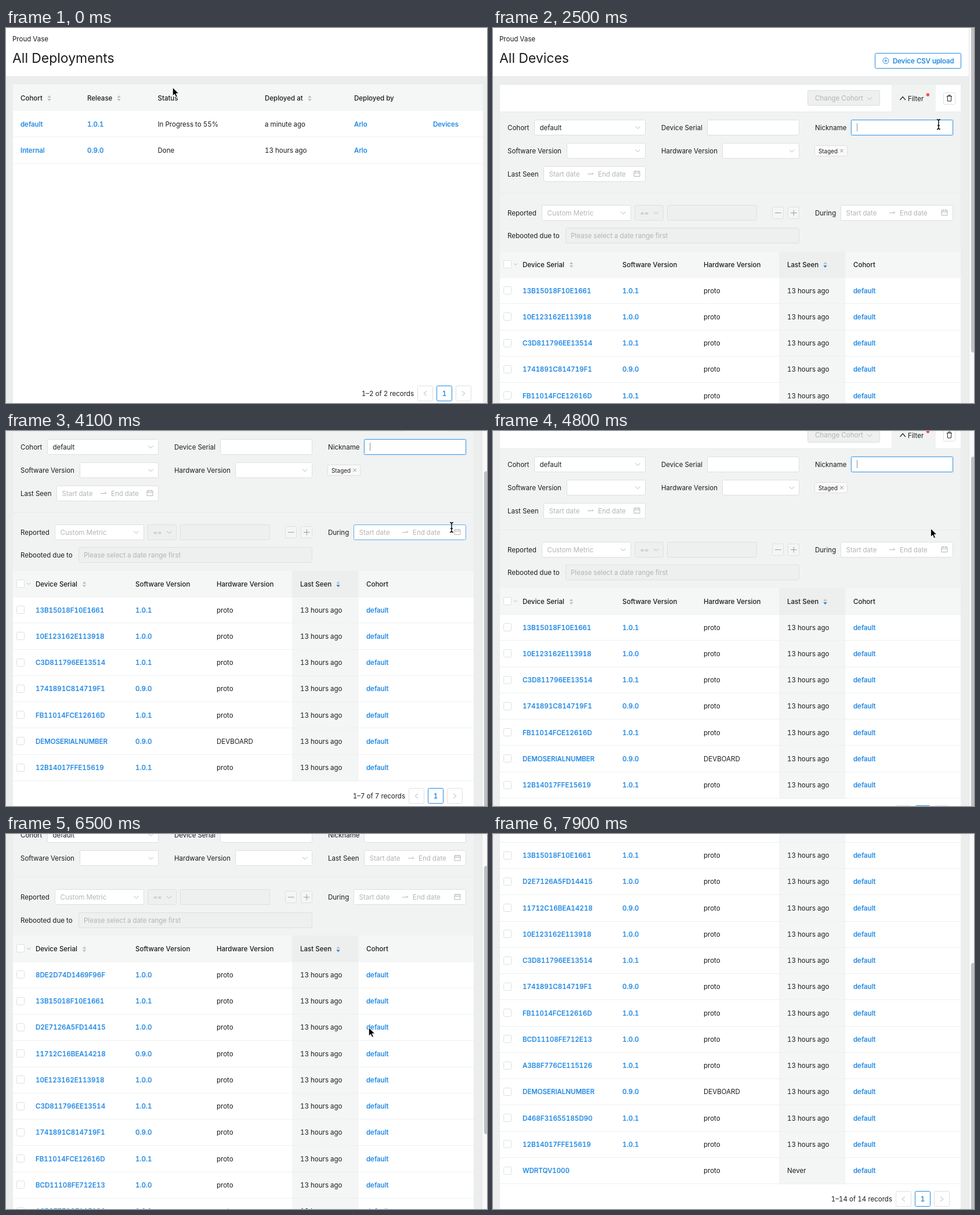
An HTML page that plays this animation: 829 px wide and 646 px high, repeating every 8 s.

```html
<!DOCTYPE html>
<html lang="en">
<head>
<meta charset="utf-8">
<title>Device filtering</title>
<style>
  html, body { margin: 0; width: 100%; height: 100%; overflow: hidden; background: #fff; }
  svg { display: block; width: 829px; height: 646px; }
  text {
    font-family: Inter, Roboto, "Liberation Sans", sans-serif;
    font-size: 11.53px; font-variant-numeric: tabular-nums;
    fill: #1c1c1c; white-space: pre;
  }
  .title { font-size: 23px; font-optical-sizing: none; }
  .head { font-weight: 500; }
  .link { font-weight: 500; fill: #2089e4; stroke: #2089e4; stroke-width: .2px; }
  .mute { fill: #b3b4b5; }
  .tag { font-size: 9.9px; }
  .line { fill: none; stroke: #b4b5b6; stroke-width: 1; }
</style>
</head>
<body>
<svg id="stage" viewBox="0 0 829 646"></svg>
<script>
const LOOP = 8000, OPEN_DEVICES = 2100, CLEAR_TAG = 5700;
const ROW = 45.25;
const BLUE = '#2089e4', PAGE = '#eceeee', PANEL = '#f1f2f2', HEAD = '#f5f6f6', BORDER = '#dedfe0', RULE = '#eef0f0';
const stage = document.getElementById('stage');

// Markup helpers; y is always the vertical centre unless it is a rect.
const text = (x, y, s, cls = '', extra = '') => `<text x="${x}" y="${y + 4.5}" class="${cls}" ${extra}>${s}</text>`;
const rect = (x, y, w, h, fill, extra = '') => `<rect x="${x}" y="${y}" width="${w}" height="${h}" fill="${fill}" ${extra}/>`;
const path = (d, extra = '') => `<path d="${d}" class="line" ${extra}/>`;
const box = (x1, x2, y, { h = 26, fill = '#fff', stroke = BORDER, id = '' } = {}) =>
  rect(Math.floor(x1) + .5, Math.floor(y - h / 2) + .5, Math.floor(x2 - x1) - 1, h, fill, `rx="2" stroke="${stroke}" ${id && `id="${id}"`}`);
const rowRule = (y, width) => rect(12, Math.round(y + 22.4), width, 1, RULE);
const chevron = (x, y, size = 4) => path(`M${x - size} ${y - size / 2}l${size} ${size}l${size} ${-size}`);
const disabled = { fill: '#eeefef' };

const sorter = (x, y, active) =>
  `<path d="M${x - 3.2} ${y - .5}h6.4l-3.2 -4z" fill="#bdbfc1"/>` +
  `<path d="M${x - 3.2} ${y + 1.5}h6.4l-3.2 4z" fill="${active ? BLUE : '#bdbfc1'}"/>`;

const calendar = (x, y) => path(`M${x - 5} ${y - 4}h10v8.5h-10zM${x - 5} ${y - 1}h10M${x - 2.5} ${y - 5.5}v3M${x + 2.5} ${y - 5.5}v3`);

const select = (x1, x2, y, label = '', cls = '', opts) =>
  box(x1, x2, y, opts) + text(x1 + 9.5, y, label, cls) + chevron(x2 - 13.5, y + .5);

function dateRange(x1, x2, y, gap, id) {
  const arrowX = x1 + gap, end = arrowX + 18;
  return box(x1, x2, y, { id }) + text(x1 + 9.5, y, 'Start date', 'mute') +
    path(`M${arrowX} ${y + .5}h10l-3 -2.5`) + text(end, y, 'End date', 'mute') + calendar(x2 - 15, y);
}

function pager(right, y, label) {
  const first = right - 93;
  return text(first - 6, y, label, '', 'text-anchor="end"') +
    box(first, first + 27, y) + path(`M${first + 16} ${y - 4}l-5 4l5 4`) +
    box(first + 33, first + 60, y, { stroke: BLUE }) +
    text(first + 46.5, y, '1', 'link', 'text-anchor="middle"') +
    box(first + 66, first + 93, y) + path(`M${first + 77} ${y - 4}l5 4l-5 4`);
}

const pageTop = (title, width) =>
  rect(0, 0, width, 1300, PAGE) + rect(0, 0, width, 83, '#fff') + rect(0, 83, width, 1, '#e3e7e7') +
  text(11, 18.5, 'Proud Vase') + `<text x="11" y="60" class="title">${title}</text>`;

function deploymentsPage() {
  const columns = [25, 140, 261.5, 446, 600, 736];
  const heads = ['Cohort', 'Release', 'Status', 'Deployed at', 'Deployed by'];
  const rows = [
    ['default', '1.0.1', 'In Progress to 55%', 'a minute ago', 'Arlo', 'Devices'],
    ['Internal', '0.9.0', 'Done', '13 hours ago', 'Arlo', '']
  ];
  let out = pageTop('All Deployments', 829) + rect(12, 97, 810, 560, '#fff') + rect(12, 97, 810, 46, HEAD);
  out += heads.map((h, i) => text(columns[i], 120, h, 'head')).join('');
  out += [74.5, 194.5, 523.5].map(x => sorter(x, 120.5)).join('');
  rows.forEach((cells, r) => {
    const y = 165 + r * ROW;
    out += rect(12, Math.round(y - 22), 810, 45, '#fff', `id="row${r}"`) + rowRule(y, 810);
    out += cells.map((c, i) => text(columns[i], y, c, i === 2 || i === 3 ? '' : 'link')).join('');
  });
  return out + pager(802, 629.5, '1–2 of 2 records');
}

// Serial, software version, and whether the device carries the staged tag.
const devices = [
  ['8DE2D74D1469F96F', '1.0.0'], ['13B15018F10E1661', '1.0.1', true],
  ['D2E7126A5FD14415', '1.0.0'], ['11712C16BEA14218', '0.9.0'],
  ['10E123162E113918', '1.0.0', true], ['C3D811796EE13514', '1.0.1', true],
  ['1741891C814719F1', '0.9.0', true], ['FB11014FCE12616D', '1.0.1', true],
  ['BCD11108FE712E13', '1.0.0'], ['A3B8F776CE115126', '1.0.1'],
  ['DEMOSERIALNUMBER', '0.9.0', true], ['D468F31655185D90', '1.0.1'],
  ['12B14017FFE15619', '1.0.1', true], ['WDRTQV1000', '']
];

function toolbar() {
  const trash = 'M782 117.5h9M785 117.5v-2h3v2M783 117.5l.6 8.5h5.8l.6 -8.5';
  return box(658, 807, 56.5, { stroke: BLUE }) +
    `<circle cx="677" cy="56.5" r="5" class="line" style="stroke:${BLUE}"/>` +
    path('M674.5 56.5h5M677 54v5', `style="stroke:${BLUE}"`) + text(689, 56.5, 'Device CSV upload', 'link') +
    rect(12, 98, 675, 46, '#fff') + rect(763, 98, 43, 46, '#fff') + rect(12, 144, 794, 1, '#e8eaea') +
    rect(687, 142, 76, 4, PANEL) +
    box(542, 667, 120.5, disabled) + text(555, 120.5, 'Change Cohort', 'mute') + chevron(649, 121.5) +
    path('M701.5 124l4.7 -5.5l4.7 5.5', 'style="stroke:#222;stroke-width:1.2"') + text(715, 121, 'Filter') +
    '<circle cx="749.5" cy="115" r="2.7" fill="#f0504f"/>' +
    box(776, 797.5, 121, { h: 20 }) + path(trash, 'style="stroke:#222"');
}

function filters(staged, shift) {
  const reported = 318 - shift, rebooted = 357.7 - shift;
  let out = text(25, 171, 'Cohort') + select(71, 263, 171, 'default') +
    text(290, 171, 'Device Serial') + box(369, 528.5, 171) + text(555, 171, 'Nickname');
  out += staged
    ? rect(616, 157, 178.5, 29, '#d5e8f8', 'rx="3"') + box(617, 793.5, 171, { stroke: '#459be2' }) +
      rect(627, 164, 1, 14, '#8c9299', 'id="caret"')
    : box(617, 793, 171);
  out += text(25, 211.3, 'Software Version') + select(127, 263, 211.3) +
    text(290, 211.3, 'Hardware Version') + select(395, 528.5, 211.3);
  out += staged
    ? box(554, 611.5, 211.5, { h: 18, fill: '#fafafa' }) + text(561, 211, 'Staged', 'tag') +
      path('M598.2 208.7l5.6 5.6m0 -5.6l-5.6 5.6', 'style="stroke:#888"') +
      text(25, 251, 'Last Seen') + dateRange(87, 263, 251, 76)
    : text(555, 211.3, 'Last Seen') + dateRange(617, 793, 211.3, 76);
  out += rect(12, Math.round(284 - shift), 794, 1, '#e9ebeb') +
    text(25, reported, 'Reported') + select(84, 238, reported, 'Custom Metric', 'mute') +
    select(244, 294.5, reported, '==', 'mute', disabled) + box(300.5, 455.5, reported, disabled);
  [481, 508].forEach((x, i) => {
    out += box(x, x + 20.5, reported, { h: 20, fill: '#f5f5f5' }) +
      path(`M${x + 5} ${reported + .5}h10.5${i ? `M${x + 10.25} ${reported - 4.5}v10` : ''}`, 'style="stroke:#999"');
  });
  return out + text(555, reported, 'During') + dateRange(599, 793, reported, 84, staged ? 'during' : '') +
    text(25, rebooted, 'Rebooted due to') + box(125, 528.5, rebooted, disabled) +
    text(134, rebooted, 'Please select a date range first', 'mute');
}

function deviceTable(list, headY) {
  const top = Math.round(headY - 22.5), bodyY = top + 46, bodyH = list.length * ROW;
  const checkbox = y => box(18, 32, y, { h: 13 });
  let out = rect(12, top, 794, bodyH + 140, '#fff') + rect(12, top, 794, 46, HEAD) +
    rect(493, top, 114.5, 46, '#edeeee') + rect(493, bodyY, 114.5, bodyH, '#f4f5f5') +
    checkbox(headY) + chevron(39, headY, 3) + sorter(135, headY + .5) + sorter(572.5, headY + .5, true);
  [[51, 'Device Serial'], [223, 'Software Version'], [363, 'Hardware Version'], [507, 'Last Seen'], [621, 'Cohort']]
    .forEach(([x, s]) => out += text(x, headY, s, 'head'));
  list.forEach(([serial, version], i) => {
    const y = headY + 45 + i * ROW;
    out += rowRule(y, 794) + checkbox(y) +
      text(51, y, serial, 'link') + text(223, y, version, 'link') +
      text(363, y, serial.startsWith('DEMO') ? 'DEVBOARD' : 'proto') +
      text(507, y, version ? '13 hours ago' : 'Never') + text(621, y, 'default', 'link');
  });
  const n = list.length;
  return out + pager(787, headY + 45 + (n - 1) * ROW + 49.3, `1–${n} of ${n} records`);
}

function devicesPage(staged) {
  const shift = staged ? 0 : 39.6;
  const list = staged ? devices.filter(d => d[2]) : devices;
  return pageTop('All Devices', 821) + rect(12, 98, 794, 400, PANEL) +
    toolbar() + filters(staged, shift) + deviceTable(list, 407 - shift);
}

stage.innerHTML =
  `<g id="deployments">${deploymentsPage()}</g><g id="staged">${devicesPage(true)}</g><g id="all">${devicesPage(false)}</g>` +
  `<g id="bar">${rect(820, 0, 9, 646, '#f9f9f9')}${rect(820, 0, 1, 646, '#e6e7e8')}` +
  `${rect(824, 0, 8, 100, '#bfc0c1', 'rx="4" id="thumb"')}</g>` +
  '<g id="cursor"><path id="arrow" d="M-.8 -.5V14.1L2.6 10.9L4.9 16.3L7.4 15.2L5.1 9.9H9.8Z" fill="#000" stroke="#fff" stroke-width="1"/>' +
  '<g id="beam" fill="none"><path d="M-3 -8.5q3 0 3 2.5v12q0 2.5 -3 2.5M3 -8.5q-3 0 -3 2.5v12q0 2.5 3 2.5M-2 2h4" stroke="#111" stroke-width="1.5"/></g></g>';

const el = Object.fromEntries([...stage.querySelectorAll('[id]')].map(n => [n.id, n]));
const show = (node, on) => node.style.display = on ? '' : 'none';

const scrollKeys = [[0, 0], [2850, 0], [3300, 46], [3750, 144], [4650, 144], [5300, 13], [5500, 0], [6220, 0], [6500, 170], [7050, 421]];
const cursorKeys = [
  [0, 288, 103], [900, 745, 140], [1200, 745, 140], [1700, 779, 175], [2000, 768, 166], [4700, 768, 166],
  [5300, 598, 198], [5500, 598, 210], [5800, 598, 210], [6400, 626, 334], [7600, 626, 334], [7850, 640, 660]
];
const smooth = p => p * p * (3 - 2 * p);

function sample(keys, t, ease = p => p) {
  const i = keys.findIndex(k => k[0] > t);
  if (i < 0) return keys[keys.length - 1].slice(1);
  const a = keys[i - 1], b = keys[i], p = ease((t - a[0]) / (b[0] - a[0]));
  return a.slice(1).map((v, j) => v + (b[j + 1] - v) * p);
}

function render(t) {
  const inDevices = t >= OPEN_DEVICES, cleared = t >= CLEAR_TAG;
  const scroll = Math.round(sample(scrollKeys, t)[0]);
  const [x, y] = sample(cursorKeys, t, smooth);

  show(el.deployments, !inDevices);
  show(el.staged, inDevices && !cleared);
  show(el.all, cleared);
  show(el.bar, inDevices);
  el.staged.setAttribute('transform', `translate(0 ${-scroll})`);
  el.all.setAttribute('transform', `translate(0 ${-scroll})`);
  el.thumb.setAttribute('y', cleared ? -58 + .665 * scroll : -51 + .835 * scroll);
  el.thumb.setAttribute('height', cleared ? 462 : 610);

  [el.row0, el.row1].forEach((row, i) => {
    const over = Math.abs(y - 165 - i * ROW) < 22.5;
    row.setAttribute('fill', over ? '#f9f9f9' : '#fff');
  });

  const docY = y + scroll, active = inDevices && t < 5300;
  const overDuring = active && x > 599 && Math.abs(docY - 318) < 13.5;
  const overNickname = active && x > 617 && Math.abs(docY - 171) < 13.5;
  const typing = overDuring || overNickname;
  el.during.setAttribute('stroke', overDuring ? '#5faae6' : BORDER);
  show(el.caret, t % 800 < 400);
  show(el.arrow, !typing);
  show(el.beam, typing);
  el.cursor.setAttribute('transform', `translate(${x} ${y})`);
}

const start = performance.now();
function tick() {
  render((performance.now() - start) % LOOP);
  requestAnimationFrame(tick);
}
render(0);
requestAnimationFrame(tick);
</script>
</body>
</html>
```
